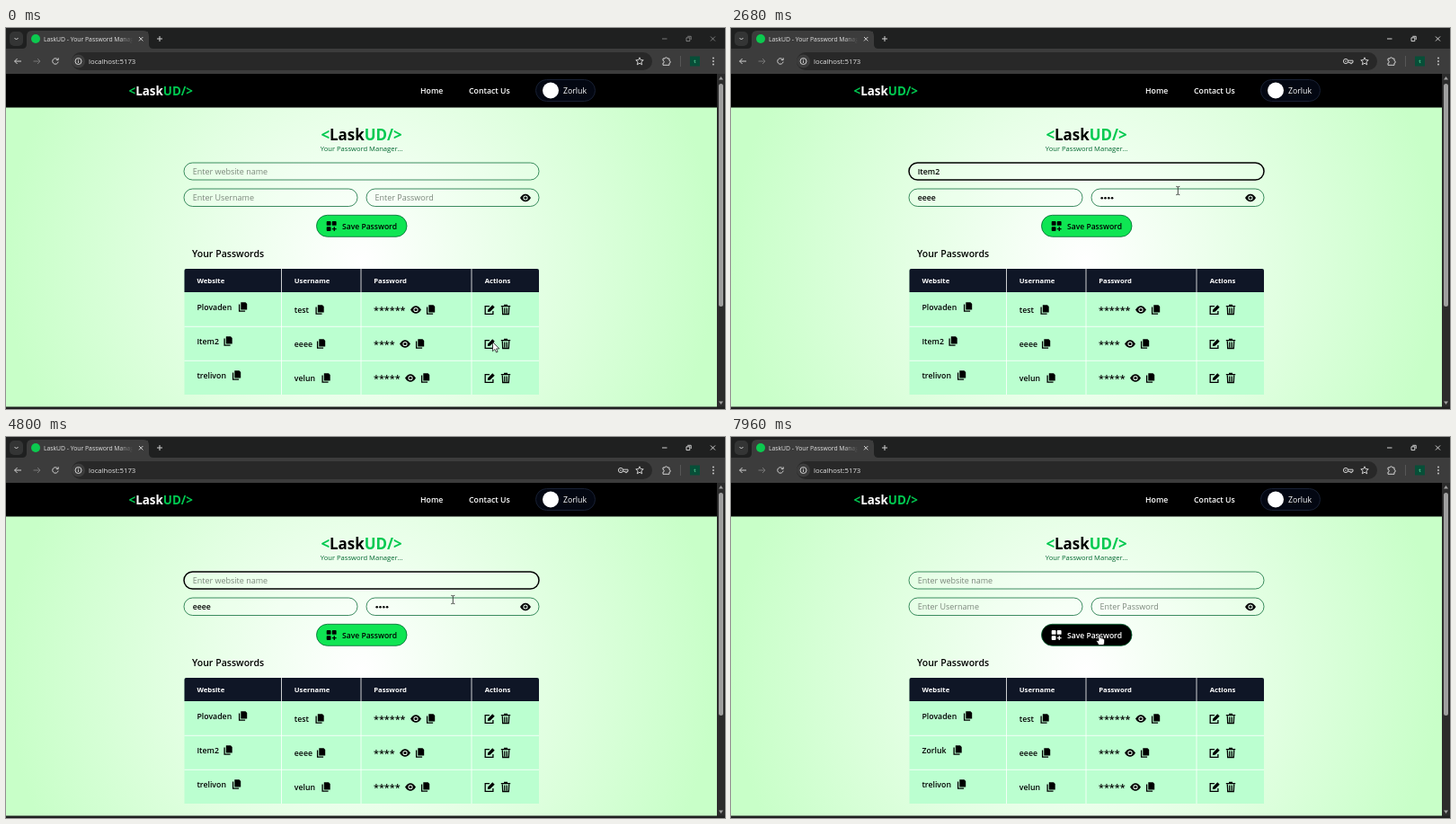
Recreate the animation shown at these times as an HTML page. Size 800x424 px, loop 8 s.

```html
<!DOCTYPE html>
<html lang="en">
<head>
<meta charset="utf-8">
<title>Password manager</title>
<style>
html, body { margin: 0; width: 100%; height: 100%; overflow: hidden; background: #1f2020; }
svg { display: block; width: 800px; height: 424px; }
text { font: 600 8.75px "Open Sans", "Noto Sans", sans-serif; white-space: pre; }
.chrome { font-weight: 400; fill: #e3e3e3; }
.brand { font-weight: 700; }
.green { fill: #00c950; }
.head { font-size: 7.7px; font-weight: 700; fill: #fff; }
.stars { font-size: 10.8px; }
.hint { fill: #7b877b; font-weight: 500; font-size: 9px; }
.line { fill: none; stroke: #000; stroke-width: 1.3; }
.thin { fill: none; stroke: #d0d0d0; stroke-width: 1; }
.field { fill: #fff; fill-opacity: .15; stroke: #016630; stroke-width: .75; }
.field.focus { stroke: #000; stroke-width: 1.5; }
</style>
</head>
<body>
<svg id="stage" viewBox="0 0 800 424">
  <defs>
    <radialGradient id="glow" gradientUnits="userSpaceOnUse" cx="395" cy="260" r="395">
      <stop offset="0" stop-color="#fff"/><stop offset="1" stop-color="#c8ffc8"/>
    </radialGradient>
    <linearGradient id="fade">
      <stop offset="0" stop-color="#3c3c3c" stop-opacity="0"/><stop offset="1" stop-color="#3c3c3c"/>
    </linearGradient>
    <g id="copy">
      <path d="M-2.2-5.2H3L4.7-3.5V2.9H-2.2Z"/>
      <path class="line" d="M-3.9-3V4.6H2.6"/>
    </g>
    <g id="eye">
      <path d="M-6 0Q-3.3-4.3 0-4.3T6 0Q3.3 4.3 0 4.3T-6 0Z"/>
      <circle r="2.6" fill="#eafff0"/><circle r="1.6"/>
    </g>
    <g id="edit">
      <path class="line" d="M0-3.8H-4.8V4.9H3.9V1.4"/>
      <path d="M-2.2 2.5L-1.8-.1 3.3-5.2 5.7-2.8.6 2.2Z"/>
    </g>
    <g id="trash">
      <path class="line" d="M-5.2-3.9H5.2M-2-5.2H2M-3.7-3L-3.3 5H3.3L3.7-3M-1.2-2V4M1.2-2V4"/>
    </g>
  </defs>

  <!-- browser window -->
  <rect width="800" height="424" fill="#1f2020"/>
  <rect x="4" y="4" width="15" height="16" rx="5" fill="#343535"/>
  <path class="thin" d="M9.5 11l2 2 2-2"/>
  <path d="M18 23q5 0 5-5V9q0-6 6-6H153q6 0 6 6v9q0 5 5 5Z" fill="#3c3c3c"/>
  <circle cx="33" cy="12" r="5" fill="#0cc94f"/>
  <text class="chrome" x="42" y="14.7" style="font-size:6.8px">LaskUD - Your Password Manager</text>
  <rect x="126" y="4" width="15" height="17" fill="url(#fade)"/>
  <rect x="141" y="4" width="17" height="17" fill="#3c3c3c"/>
  <path class="thin" d="M148 10l4.4 4.4m0-4.4l-4.4 4.4M168 12h6m-3-3v6"/>
  <g id="controls"><path class="thin" d="M730 12h5.5M784 9.5l5 5m0-5l-5 5M757 10.8h3.8v3.8H757ZM758.3 9.3H762.2V13"/></g>
  <rect y="23" width="800" height="28" fill="#3c3c3c"/>
  <path class="thin" d="M17 37H9.6m3-3l-3 3 3 3"/>
  <path class="thin" d="M30.5 37H38m-3-3l3 3-3 3" style="stroke:#777"/>
  <path class="thin" d="M57.6 35.2a3.2 3.2 0 1 0 .5 2.3M58.2 33.3v2.3h-2.3"/>
  <rect x="73" y="27" width="646" height="20" rx="10" fill="#282828"/>
  <circle cx="80.5" cy="37" r="7.5" fill="#3c3c3c"/>
  <circle class="thin" cx="80.5" cy="37" r="3.5"/><path class="thin" d="M80.5 36.5v2.3M80.5 34.7v.9"/>
  <text class="chrome" x="92" y="39.8" style="font-size:7.75px">localhost:5173</text>
  <g id="key"><circle class="thin" cx="684" cy="37" r="2.6"/><circle cx="684" cy="37" r=".8" fill="#d0d0d0"/><path class="thin" d="M686.6 36.2H692v2.2h-1.2v1.2h-1.6v-1.2h-2.6"/></g>
  <path class="thin" d="M705 32.8l1.2 2.8 3 .2-2.3 2 .8 3-2.7-1.6-2.7 1.6.8-3-2.3-2 3-.2Z"/>
  <path class="thin" d="M731 34h2.2a1.3 1.3 0 0 1 2.6 0H738v2.5a1.3 1.3 0 0 1 0 2.6v2.2h-7V39a1.3 1.3 0 0 0 0-2.6Z"/>
  <path d="M750.5 31v12" stroke="#575757"/>
  <rect x="761" y="31.500" width="11" height="11" fill="#074f38"/>
  <text x="765.2" y="39.2" style="font-size:6px" fill="#5fd89d">t</text>
  <g fill="#d0d0d0"><circle cx="787" cy="33.500" r=".9"/><circle cx="787" cy="37" r=".9"/><circle cx="787" cy="40.500" r=".9"/></g>

  <!-- page -->
  <rect y="51" width="791" height="370.500" fill="url(#glow)"/>
  <rect x="791" y="51" width="8.500" height="370.500" fill="#2c2c2c"/>
  <rect x="793" y="62" width="5" height="248" rx="2.500" fill="#9f9f9f"/>
  <path d="M793 57.500l2.500-3.500 2.500 3.500ZM793 415.500l2.500 3.500 2.500-3.500Z" fill="#9f9f9f"/>
  <rect y="51" width="791" height="37.500"/>
  <text class="brand" x="136.500" y="75.300" style="font-size:13.400px" fill="#fff"><tspan class="green">&lt;</tspan>Lask<tspan class="green">UD/&gt;</tspan></text>
  <g fill="#fff">
    <text x="461" y="73">Home</text><text x="515" y="73">Contact Us</text>
    <rect x="589.500" y="57.500" width="66" height="24" rx="12" fill="#030712" stroke="#182033"/>
    <circle cx="606" cy="69.500" r="9"/>
    <text x="620" y="73" style="font-weight:500">Zorluk</text>
  </g>
  <text class="brand" x="395.500" y="125" text-anchor="middle" style="font-size:16.900px"><tspan class="green">&lt;</tspan>Lask<tspan class="green">UD/&gt;</tspan></text>
  <text x="395.700" y="137" text-anchor="middle" style="font-size:7.600px;font-weight:500" fill="#016630">Your Password Manager...</text>

  <rect id="siteBox" class="field" x="198" y="150" width="395" height="19" rx="9.500"/>
  <rect class="field" x="198" y="179" width="193" height="19.500" rx="9.700"/>
  <rect class="field" x="401" y="179" width="192" height="19.500" rx="9.700"/>
  <text id="site" x="207.700" y="162.800"></text>
  <rect id="caret" y="154" width=".8" height="11"/>
  <text id="login" x="207.700" y="192.200"></text>
  <text id="secretHint" class="hint" x="410.500" y="192.200">Enter Password</text>
  <g id="dots"></g>
  <use href="#eye" x="578" y="189"/>

  <rect id="button" x="345.500" y="208.300" width="100.500" height="24" rx="12" stroke="#016630" stroke-width=".8"/>
  <g id="label">
    <rect x="356.700" y="215" width="4.800" height="4.800" rx=".9"/><rect x="362.800" y="215" width="4.800" height="4.800" rx=".9"/>
    <rect x="356.700" y="221.200" width="4.800" height="4.800" rx=".9"/><path d="M364.600 221.200h1.300v1.700h1.700v1.300h-1.700v1.700h-1.300v-1.700h-1.700v-1.300h1.700Z"/>
    <text x="374" y="223.500" style="font-size:8.550px">Save Password</text>
  </g>
  <text x="207" y="254.800" style="font-size:10.550px">Your Passwords</text>
  <g id="table"></g>

  <g id="cursor">
    <path id="arrow" d="M0 0V10.200L2.400 8 4 11.500 5.600 10.800 4.100 7.400H7.300Z" fill="#fff" stroke="#000" stroke-width=".7"/>
    <path id="hand" d="M-1 1q0-1.200 1-1.200T1 1V4.300q1.200-.5 1.700.4 1.200-.4 1.600.5 1.300-.2 1.300 1V8.500Q5.600 11 4.300 12H-.7Q-2 10-3.300 7.800-3.300 6.300-1 7.300Z" fill="#fff" stroke="#000" stroke-width=".7"/>
    <path id="beam" class="line" style="stroke-width:.9;stroke:#333" d="M-2-4.700q2 0 2 1.200 0-1.200 2-1.200M0-3.500V3.500M-2 4.700q2 0 2-1.200 0 1.200 2 1.200"/>
  </g>
</svg>
<script>
const LOOP = 8000, FILL = 600, FOCUS = 2100, SAVE = 7400;
const el = id => document.getElementById(id);
const show = (id, on) => el(id).setAttribute('visibility', on ? 'visible' : 'hidden');
const text = (x, y, s, attrs = '') => `<text x="${x}" y="${y}" ${attrs}>${s}</text>`;
const icon = (name, x, y) => `<use href="#${name}" x="${x}" y="${y}"/>`;

// site, site icon x, login, login icon x, password length
const rows = [
  ['Plovaden', 263.5, 'test', 349, 6],
  ['Item2', 247, 'eeee', 350.5, 4],
  ['trelivon', 256.5, 'velun', 356, 5]
];

el('table').innerHTML =
  '<path d="M198.500 408V270q0-2 2-2H591q2 0 2 2V408Z" fill="#bbffd0"/>' +
  '<path d="M198.500 294V270q0-2 2-2H591q2 0 2 2V294Z" fill="#0f1626"/>' +
  [['Website', 212.5], ['Username', 320.8], ['Password', 409.2], ['Actions', 532.7]]
    .map(([s, x]) => text(x, 284, s, 'class="head"')).join('') +
  '<path d="M306.500 268V408M395 268V408M518 268V408M198.500 332.300H593M198.500 370.300H593" stroke="#fff" stroke-width=".8"/>' +
  rows.map(([site, siteX, login, loginX, stars], i) => {
    const y = 313.5 + i * 38, end = 409 + stars * 6;
    return text(212.4, y + .4, site, `id="row${i}"`) +
      `<g id="copy${i}">${icon('copy', siteX, y - 3)}</g>` +
      text(320.8, y + 3.6, login) + icon('copy', loginX, y) +
      text(409, y + 4.9, '*'.repeat(stars), 'class="stars"') +
      icon('eye', end + 11, y) + icon('copy', end + 27.5, y) +
      icon('edit', 538, y) + icon('trash', 556, y);
  }).join('');

el('dots').innerHTML = [0, 1, 2, 3].map(i => `<circle cx="${412.7 + i * 3.8}" cy="189.200" r="1.300"/>`).join('');

const typed = [[FOCUS, 'Item2'], [2950, 'Item'], [3750, 'Ite'], [3900, 'It'], [4050, 'I'], [4200, '']];
[...'Zorluk'].forEach((c, i, all) => typed.push([4980 + i * 160, all.slice(0, i + 1).join('')]));

const path = [
  [0, 541.5, 349.5], [160, 541.5, 349.5], [440, 535.5, 348], [1400, 535.5, 348], [2000, 503, 160],
  [2200, 503, 160], [2500, 497.3, 181], [6300, 497.3, 181], [6950, 410, 219.5], [LOOP, 410, 219.5]
];

function pointer(t) {
  const i = path.findIndex(p => p[0] > t);
  const [t0, x0, y0] = path[i - 1], [t1, x1, y1] = path[i];
  const u = (t - t0) / (t1 - t0), e = u * u * (3 - 2 * u);
  return [x0 + (x1 - x0) * e, y0 + (y1 - y0) * e];
}

function setField(id, value, hint) {
  el(id).textContent = value || hint;
  el(id).setAttribute('class', value ? '' : 'hint');
}

function render(t) {
  const filled = t >= FILL && t < SAVE, focused = t >= FOCUS && t < SAVE, saved = t >= SAVE;
  const [keyTime, value] = typed.filter(k => k[0] <= t).pop() || [0, 'Item2'];
  setField('site', filled ? value : '', 'Enter website name');
  setField('login', filled ? 'eeee' : '', 'Enter Username');
  show('secretHint', !filled);
  show('dots', filled);
  show('key', t >= FILL);
  el('controls').setAttribute('opacity', t < 200 ? .5 : 1);
  el('siteBox').classList.toggle('focus', focused);
  show('caret', focused && (t - keyTime) % 1000 < 500);
  el('caret').setAttribute('x', 208 + (value ? el('site').getComputedTextLength() : 0));

  el('row1').textContent = saved ? 'Zorluk' : 'Item2';
  el('copy1').setAttribute('transform', `translate(${saved ? 5 : 0})`);

  const [x, y] = pointer(t);
  const inside = (l, r, top, bottom) => x > l && x < r && y > top && y < bottom;
  const hover = inside(345, 446, 208, 233);
  const beam = inside(198, 593, 150, 169) || inside(401, 571, 179, 199);
  const hand = hover || inside(532, 540, 346, 358);
  el('button').setAttribute('fill', hover ? '#000' : '#0fe553');
  el('label').setAttribute('fill', hover ? '#fff' : '#000');
  show('beam', beam);
  show('hand', hand);
  show('arrow', !beam && !hand);
  el('cursor').setAttribute('transform', `translate(${x} ${y})`);
}

const start = performance.now();
function tick() {
  render((performance.now() - start) % LOOP);
  requestAnimationFrame(tick);
}
tick();
</script>
</body>
</html>
```
